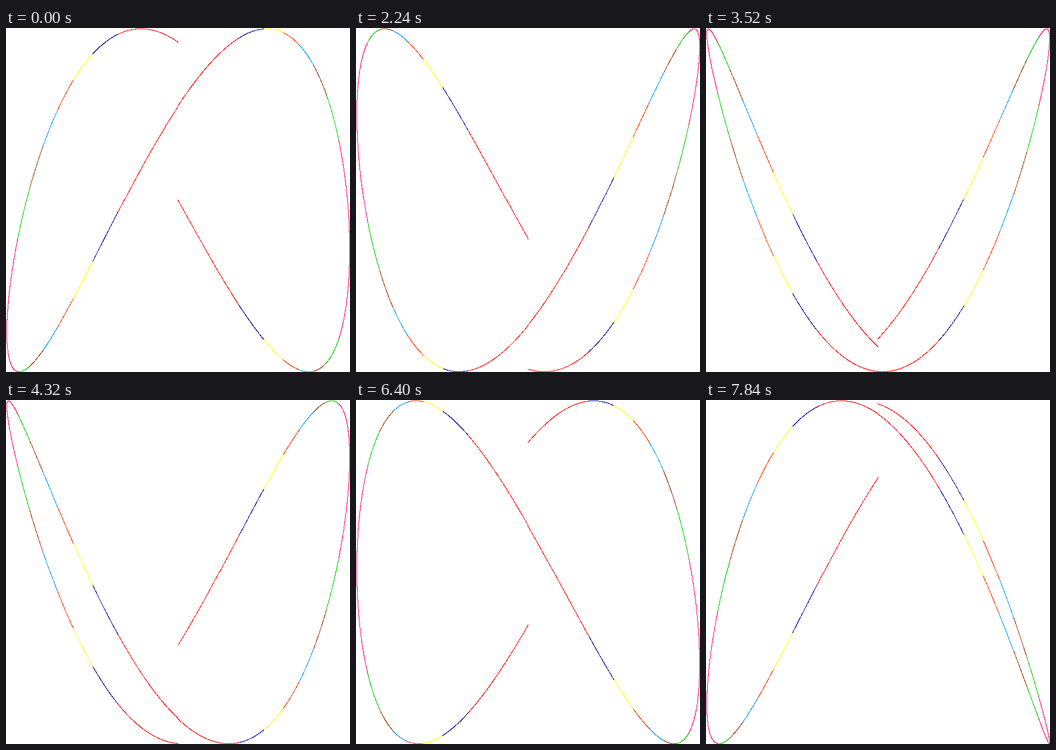
Animation, 601 px wide and 601 px high, one loop 8000 ms. Source, as an HTML page with a canvas:

```html
<!DOCTYPE html>
<html lang="en">
<head>
<meta charset="utf-8">
<title>Lissajous figure</title>
<style>
  html, body { margin: 0; width: 100%; height: 100%; overflow: hidden; background: #fff; }
  canvas { display: block; width: 601px; height: 601px; image-rendering: pixelated; }
</style>
</head>
<body>
<canvas id="stage" width="601" height="601"></canvas>
<script>
const SIZE = 300;
const STEP_MS = 160;
const STEPS = 50;
const PHASE_STEP = 0.1;
const FREQ = 1.8139808639388588;
const RES = 0.001;
const COLORS = ['#ff0000', '#000099', '#ffff00', '#ff3300',
                '#0099ff', '#993300', '#00cc00', '#ff0066'];

const ctx = document.getElementById('stage').getContext('2d');

// Rounds half up, then truncates toward zero, so the curve spans 1..600.
const toPixel = v => SIZE + Math.trunc(v * SIZE + 0.5);

function draw(phase) {
  ctx.fillStyle = '#fff';
  ctx.fillRect(0, 0, 2 * SIZE + 1, 2 * SIZE + 1);
  for (let t = 0; t < 2 * Math.PI; t += RES) {
    const x = Math.sin(t);
    const y = Math.sin(t * FREQ + phase);
    // Colour bands are equal steps of x squared.
    ctx.fillStyle = COLORS[Math.min(7, Math.floor(x * x * 8))];
    ctx.fillRect(toPixel(x), toPixel(y), 1, 1);
  }
}

let shown = -1;
function tick() {
  const step = Math.floor(performance.now() / STEP_MS) % STEPS;
  if (step !== shown) {
    shown = step;
    draw(step * PHASE_STEP);
  }
  requestAnimationFrame(tick);
}
tick();
</script>
</body>
</html>
```
